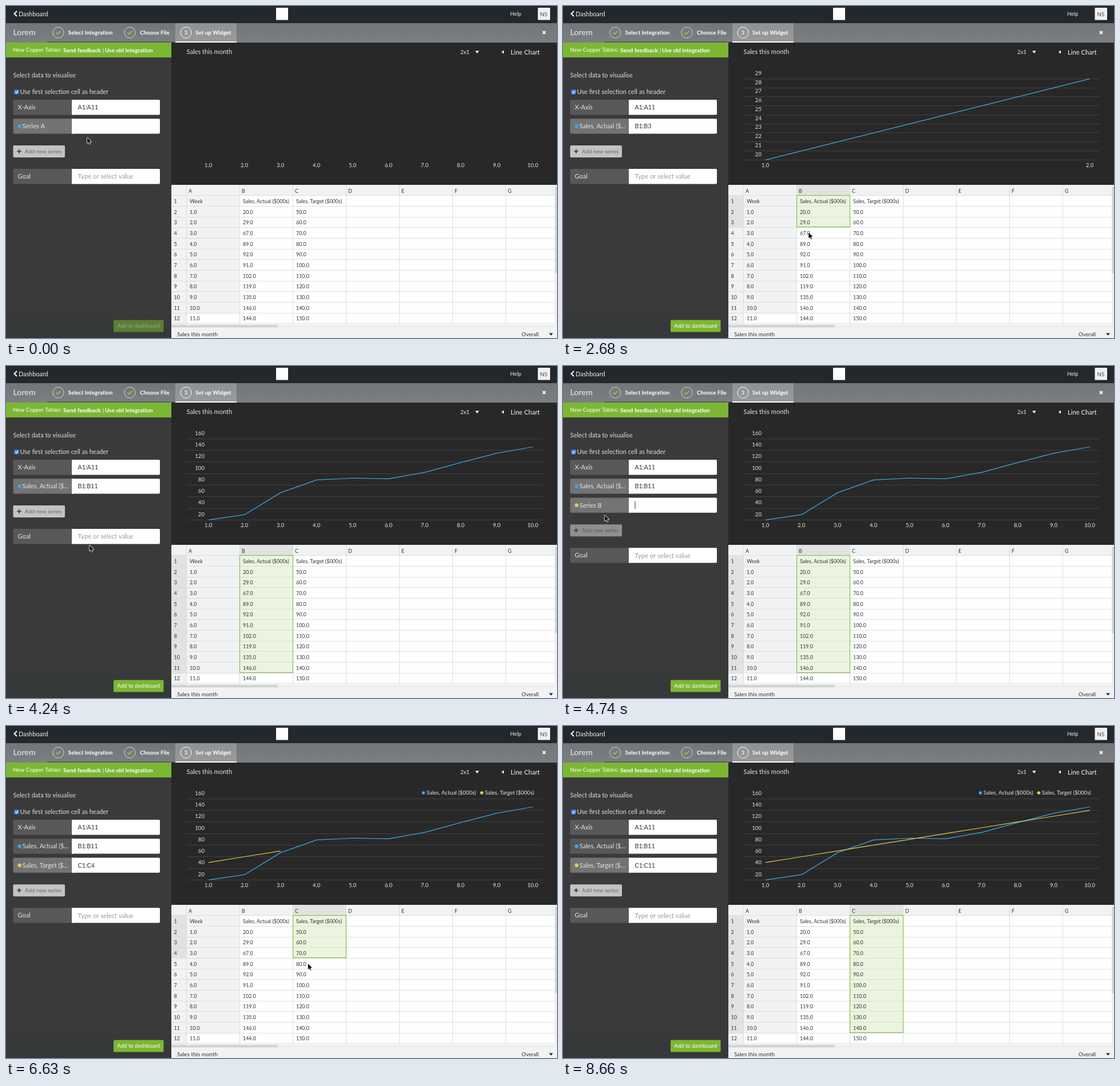
Recreate the animation shown at these times as an HTML page with a canvas. Size 963 by 581 pixels, loop 9.3 s.

```html
<!DOCTYPE html>
<html lang="en">
<head>
<meta charset="utf-8">
<title>Set up Widget</title>
<style>
html, body { margin: 0; width: 100%; height: 100%; overflow: hidden; background: #282828; }
canvas { display: block; width: 963px; height: 581px; }
</style>
</head>
<body>
<canvas id="stage" width="963" height="581"></canvas>
<script>
const ctx = document.getElementById('stage').getContext('2d');
const LOOP = 9300;
const BLUE = '#38a9e8', YELLOW = '#e8c94b', GREEN = '#7cb734';
const PRESS_B = 2390, ADD = 4590, FOCUS_B = 4900, PRESS_C = 6230;
const actual = [20, 29, 67, 89, 92, 91, 102, 119, 135, 146, 144];
const target = actual.map((_, i) => 50 + 10 * i);

// Pointer moves: start, end, x, y
const HOME = [142, 230];
const moves = [
  [330, 450, 143, 215],
  [1500, 2190, 425, 347],
  [2450, 2990, 436, 474],
  [2990, 3450, 441, 526],
  [3740, 4440, 73, 261],
  [4740, 6050, 521, 341],
  [PRESS_C, 7150, 538, 527],
  [7530, 7680, 554, 521],
  [8160, 8660, 812, 590]
];

const ease = k => k * k * (3 - 2 * k);
function pointerAt(t) {
  let [x, y] = HOME;
  for (const [a, b, u, v] of moves) {
    const k = ease(Math.max(0, Math.min(1, (t - a) / (b - a))));
    x += (u - x) * k;
    y += (v - y) * k;
  }
  return [x, y];
}

const rowY = i => Math.round(331.4 + 18.66 * i);
const colX = i => 316 + 93 * i;
const fieldY = i => 164 + 33.2 * i;

// The selection follows the pointer a moment late
function selectedRows(t, press, release) {
  if (t < press) return 0;
  const y = pointerAt(Math.min(t - 60, release))[1];
  return Math.floor((y - 332) / 18.66) + 1;
}
const within = (t, a, b) => t >= a && t < b;
const blink = (t, from, to) => within(t, from, to) && (t - from) % 1080 < 540;
const range = (col, n) => n ? col + '1' + (n > 1 ? ':' + col + n : '') : '';

function rect(x, y, w, h, color) {
  ctx.fillStyle = color;
  ctx.fillRect(x, y, w, h);
}
function round(x, y, w, h, color, r = 2) {
  ctx.fillStyle = color;
  ctx.beginPath();
  ctx.roundRect(x, y, w, h, r);
  ctx.fill();
}
function shade(x, y, w, h, top, bottom) {
  const g = ctx.createLinearGradient(0, y, 0, y + h);
  g.addColorStop(0, top);
  g.addColorStop(1, bottom);
  rect(x, y, w, h, g);
}
function dot(x, y, r, color) {
  ctx.fillStyle = color;
  ctx.beginPath();
  ctx.arc(x, y, r, 0, 7);
  ctx.fill();
}
function path(points, color, width) {
  ctx.strokeStyle = color;
  ctx.lineWidth = width;
  ctx.beginPath();
  for (const [x, y] of points) ctx.lineTo(x, y);
  ctx.stroke();
}
function shape(points, color) {
  ctx.fillStyle = color;
  ctx.beginPath();
  for (const [x, y] of points) ctx.lineTo(x, y);
  ctx.closePath();
  ctx.fill();
}
// y is the middle of the capitals
function text(s, x, y, size, color, weight = 400, align = 'left') {
  ctx.font = `${weight} ${size}px Lato, sans-serif`;
  ctx.textAlign = align;
  ctx.fillStyle = color;
  ctx.fillText(s, x, y + size * 0.36);
}

function drawBars() {
  rect(0, 0, 963, 30, '#23282c');
  path([[19, 9], [14.5, 13.5], [19, 18]], '#fff', 2);
  text('Dashboard', 22, 13.7, 10.8, '#f0f0f0');
  rect(472, 3, 21, 21.5, '#fff');
  text('Help', 881, 14, 9.4, '#eee');
  round(929.5, 3, 21.5, 21.5, '#f1f1f2', 1);
  text('NS', 940, 14, 9.8, '#444', 400, 'center');

  shade(0, 30, 963, 34, '#72767a', '#7c7f81');
  rect(72, 62, 224, 2, '#5c6063');
  shade(296, 30, 107, 34, '#8f9294', '#989a9b');
  rect(296, 62, 107, 2, '#fff');
  text('Lorem', 12.5, 46, 14.3, '#f0f0f0');
  [91.5, 216.5, 314.5].forEach((x, i) => {
    ctx.strokeStyle = i < 2 ? '#d2d4d5' : '#fff';
    ctx.lineWidth = 1;
    ctx.beginPath();
    ctx.arc(x, 46.5, 9.5, 0, 7);
    ctx.stroke();
    if (i < 2) path([[x - 4, 46.5], [x - 1.3, 49.3], [x + 4, 43.8]], '#8fce3c', 1.8);
    else text('3', x, 46.5, 10, '#fff', 400, 'center');
  });
  text('Select Integration', 108.5, 46.5, 9.9, '#fff', 700);
  text('Choose File', 234, 46.5, 10, '#fff', 700);
  text('Set up Widget', 331, 46.5, 9.9, '#fff', 700);
  path([[938, 44], [943, 49]], '#fff', 1.8);
  path([[943, 44], [938, 49]], '#fff', 1.8);
}

function drawField(y, label, value, active, color) {
  const h = 26.4, mid = y + 13.3;
  round(12.5, y, 104, h, active ? '#737373' : '#585858');
  round(115, y, 154, h, '#fff');
  rect(115, y, 3, h, '#fff');
  if (color) dot(23.8, mid, 3.3, color);
  text(label, color ? 28.8 : 20.5, mid, 11, '#e6e6e6');
  text(value, 125.5, mid, 10.7, '#333');
}

function drawSidebar(t, b, c) {
  const added = t >= ADD, shift = added ? 33.2 : 0;
  rect(0, 64, 289, 517, '#3a3a3a');
  shade(0, 536, 289, 45, '#383a3a', '#343838');
  rect(0, 64, 289, 26, GREEN);
  text('New Copper Tables:', 12.5, 77, 9.6, '#fff');
  text('Send feedback', 100, 77, 10.1, '#fff', 700);
  text('|', 170, 77, 10, '#fff', 400, 'center');
  text('Use old integration', 173, 77, 9.9, '#fff', 700);

  text('Select data to visualise', 12.5, 121, 11, '#dedede');
  round(14.5, 146.5, 8, 8, '#3f8df2', 1.5);
  path([[16.3, 150.6], [18, 152.4], [20.9, 148.4]], '#fff', 1.2);
  text('Use first selection cell as header', 24.5, 150, 11, '#dedede');

  drawField(fieldY(0), 'X-Axis', 'A1:A11', false);
  drawField(fieldY(1), b ? 'Sales, Actual ($...' : 'Series A', range('B', b), t < FOCUS_B, BLUE);
  if (added) drawField(fieldY(2), c ? 'Sales, Target ($...' : 'Series B', range('C', c), true, YELLOW);
  if (blink(t, 1500, PRESS_B)) rect(125.5, 204, 1, 13, '#333');
  if (blink(t, ADD, PRESS_C)) rect(125.5, 237, 1, 13, '#333');

  const [px, py] = pointerAt(t);
  const hover = px < 103 && within(py, 244, 265 + shift), y = 244 + shift;
  round(12.5, y, 90.5, 21, hover ? '#8f8f8f' : '#c3c3c3');
  rect(19.5, y + 9.4, 7, 2, '#444');
  rect(22, y + 6.9, 2, 7, '#444');
  text('Add new series', 33, y + 10.5, 9.6, hover ? '#5c5c5c' : '#6a6a6a');

  drawField(285 + shift, 'Goal', '', false);
  text('Type or select value', 125.5, 298.3 + shift, 11.2, '#999');

  ctx.globalAlpha = b ? 1 : 0.55;
  round(188, 549.5, 87.5, 21, GREEN);
  text('Add to dashboard', 231.7, 560, 9.6, b ? '#fff' : '#c3cfb4', 400, 'center');
  ctx.globalAlpha = 1;
}

function niceStep(span) {
  for (let p = 1; ; p *= 10)
    for (const m of [1, 2, 5]) if (span / (m * p) <= 10) return m * p;
}

function drawChart(b, c) {
  rect(289, 64, 674, 249, '#282828');
  text('Sales this month', 315.5, 80, 11.1, '#e2e2e2');
  text('2x1', 794, 80.5, 9.8, '#eee');
  shape([[820, 78.5], [827, 78.5], [823.5, 82.7]], '#fff');
  shape([[870, 77.5], [870, 83.5], [866, 80.5]], '#fff');
  text('Line Chart', 882, 80.5, 11.2, '#f4f4f4');

  const n = b > 2 ? b - 1 : 10;
  const px = i => 354 + 567 * i / (n - 1);
  if (b > 2) {
    const data = actual.slice(0, n), low = data[0], span = Math.max(...data) - low;
    const step = niceStep(span), count = Math.ceil(span / step);
    const py = v => 269.3 - 142 * (v - low) / (count * step);
    for (let i = 0; i <= count; i++) {
      const y = py(low + i * step);
      rect(316, Math.floor(y), 622, 1, '#404040');
      text(String(low + i * step), 347, y - 10, 9.6, '#e8e8e8', 400, 'right');
    }
    for (let i = 0; i < n; i++) rect(px(i) - 0.5, 125, 1, 147, '#282828');
    const plot = (values, color) => path(values.map((v, i) => [px(i), py(v)]), color, 1.2);
    ctx.lineJoin = 'round';
    plot(data, BLUE);
    if (c > 2) plot(target.slice(0, c - 1), YELLOW);
    ctx.lineJoin = 'miter';
  }
  for (let i = 0; i < n; i++)
    text((i + 1).toFixed(1), px(i) - 0.3, 278.5, 9.5, '#e8e8e8', 400, 'center');
  if (c) {
    dot(729.5, 117, 2.8, BLUE);
    text('Sales, Actual ($000s)', 735, 117, 9.6, '#e4e4e4');
    dot(831.5, 117, 2.8, YELLOW);
    text('Sales, Target ($000s)', 837, 117, 9.6, '#e4e4e4');
  }
}

function drawTable(col, rows) {
  const head = '#f1f2f4', lit = '#e0e2e4', line = '#dadddf', ink = '#333';
  const top = rowY(0);
  rect(289, 313, 674, 268, '#fff');
  rect(289, 313, 674, top - 313, head);
  rect(289, 313, 27, 244, head);
  rect(316, top, 93, rowY(11) - top, head);
  if (rows) {
    rect(colX(col), 313, 93, top - 313, lit);
    rect(289, top, 27, rowY(rows) - top, lit);
  }
  for (let i = 0; i < 7; i++) {
    rect(colX(i) - 1, 313, 1, 244, line);
    text('ABCDEFG'[i], colX(i) + 3, 323.3, 9, ink);
  }
  for (let i = 0; i < 13; i++) rect(289, rowY(i), 670, 1, line);
  if (rows) {
    const x = colX(col) - 0.5, h = rowY(rows) - top;
    rect(x, top, 93, h, '#ebf4de');
    for (let i = 1; i < rows; i++) rect(x, rowY(i), 93, 1, '#d6e3c6');
    ctx.strokeStyle = '#88bf4a';
    ctx.lineWidth = 1.2;
    ctx.strokeRect(x, top + 0.5, 93, h - 1);
  }
  for (let i = 0; i < 12; i++) {
    const y = 341.8 + 18.66 * i;
    const cells = i
      ? [i, actual[i - 1], target[i - 1]].map(v => v.toFixed(1))
      : ['Week', 'Sales, Actual ($000s)', 'Sales, Target ($000s)'];
    text(String(i + 1), 293.5, y, 9, ink);
    cells.forEach((s, k) => text(s, colX(k) + 5, y, 8.95, ink));
  }

  rect(959, 313, 4, 244, '#efeff0');
  round(959.5, 316, 3.5, 152, '#d2d3d4');
  rect(289, 557, 674, 6, '#efeff0');
  round(289, 558, 186, 4.5, '#d2d3d4');
  rect(289, 563, 674, 18, head);
  text('Sales this month', 299, 574, 9.9, ink);
  text('Overall', 901, 574.5, 9.5, ink);
  shape([[949, 572.5], [956, 572.5], [952.5, 576.7]], '#222');
}

function drawPointer(t) {
  const [x, y] = pointerAt(t);
  const tops = t < ADD ? [fieldY(0), fieldY(1), 285] : [fieldY(0), fieldY(1), fieldY(2), 318];
  if (within(x, 115, 269) && tops.some(top => within(y, top, top + 26))) {
    path([[x, y - 5], [x, y + 5]], '#222', 1);
    for (const s of [-1, 1])
      path([[x - 2.5, y + 6 * s], [x, y + 4.7 * s], [x + 2.5, y + 6 * s]], '#222', 1);
    return;
  }
  const arrow = [[0, 0], [0, 10], [2.3, 8], [3.9, 11.6], [5.6, 10.9], [4, 7.4], [7.2, 7.2], [0, 0]]
    .map(([u, v]) => [x + u, y + v]);
  ctx.lineJoin = 'round';
  path(arrow, '#fff', 1.4);
  ctx.lineJoin = 'miter';
  shape(arrow, '#111');
}

function draw(t) {
  const b = selectedRows(t, PRESS_B, 3600), c = selectedRows(t, PRESS_C, 7400);
  drawBars();
  drawSidebar(t, b, c);
  drawChart(b, c);
  if (c) drawTable(2, c);
  else drawTable(1, t < FOCUS_B ? b : 0);
  drawPointer(t);
}

let start;
function tick(now) {
  if (start === undefined) start = now;
  draw((now - start) % LOOP);
  requestAnimationFrame(tick);
}
draw(0);
requestAnimationFrame(tick);
</script>
</body>
</html>
```
